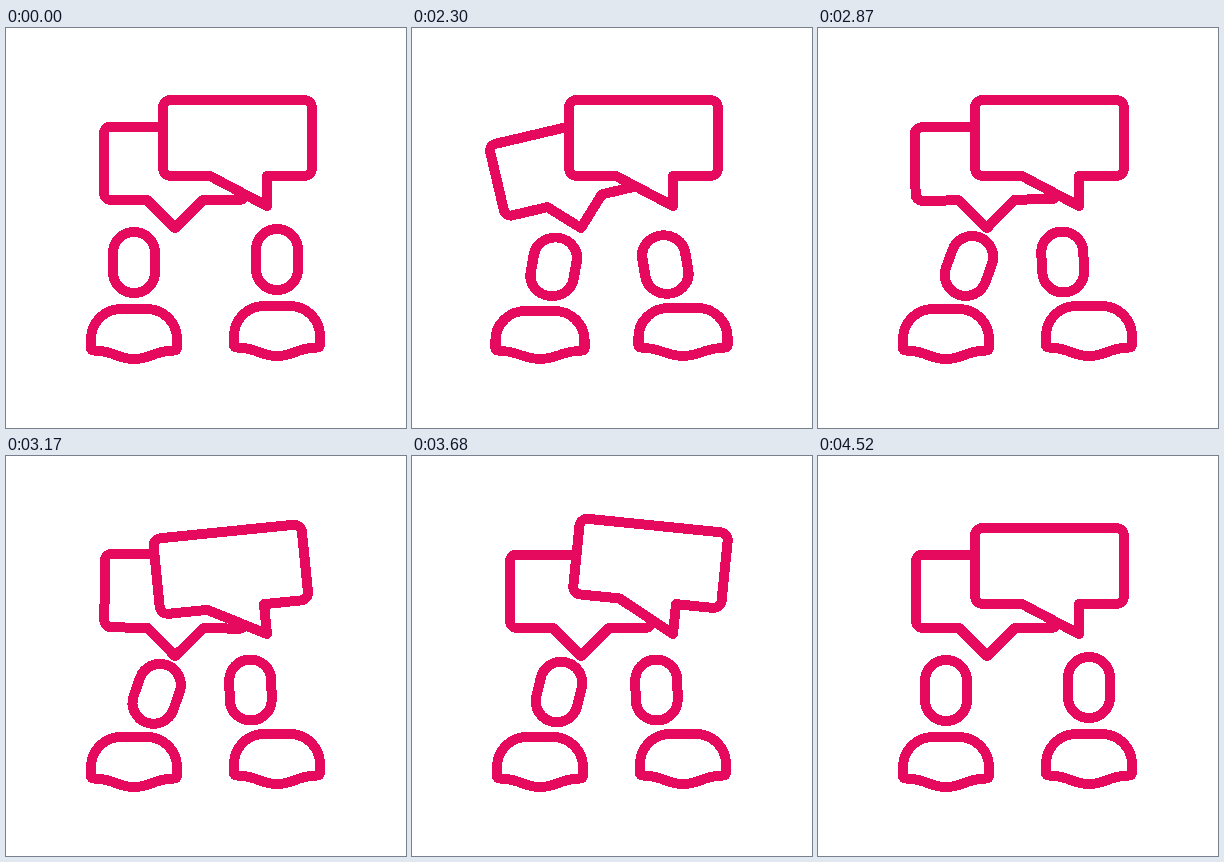
An HTML page for the animation above (4550 ms loop, 400 px wide and 400 px high).

```html
<!DOCTYPE html>
<html>
<head>
<meta charset="utf-8">
<style>
  html, body { margin: 0; width: 100%; height: 100%; overflow: hidden; background: #fff; }
  svg { display: block; width: 100vw; height: 100vh; shape-rendering: crispEdges; }
  path, rect { fill: #fff; stroke: #e60a5e; stroke-width: 10; stroke-linejoin: round; }
</style>
</head>
<body>
<svg viewBox="0 0 400 400">
  <defs>
    <path id="body" d="M-43 -11V-20A30 30 0 0 1 -13 -50H13A30 30 0 0 1 43 -20V-11Q43 -8.500 40 -8.500C18 -8 18 0 0 0S-18 -8 -40 -8.500Q-43 -8.500 -43 -11Z"/>
    <rect id="head" x="-21" y="-127" width="42" height="61" rx="21"/>
  </defs>
  <g id="left"><use href="#body"/><use class="head" href="#head"/></g>
  <g id="right"><use href="#body"/><use class="head" href="#head"/></g>
  <path id="back" d="M105 98.500H233a7 7 0 0 1 7 7V165a7 7 0 0 1 -7 7H197L169 200L141 172H105a7 7 0 0 1 -7 -7V105.500a7 7 0 0 1 7 -7Z"/>
  <path id="front" d="M165 72H298a8 8 0 0 1 8 8V140a8 8 0 0 1 -8 8H261V178L204 148H165a8 8 0 0 1 -8 -8V80a8 8 0 0 1 8 -8Z"/>
</svg>
<script>
const LOOP = 4550, MOVE = 500, BEAT = 248;
const SPEAK = 1983, NOD = 2400, REPLY = 3083, RIGHT_BACK = 3690, LEFT_BACK = 4015;
const $ = selector => document.querySelector(selector);
const progress = (t, start, length = MOVE) => Math.min(1, Math.max(0, (t - start) / length));
const ramp = (...args) => { const p = progress(...args); return p * p * (3 - 2 * p); };
const between = (t, from, to) => ramp(t, from) - ramp(t, to);
const bump = (t, start) => Math.sin(Math.PI * progress(t, start)) ** 2;

// Alternating swing that loses 5 degrees with every beat
function swing(t, start) {
  let angle = 0;
  for (let i = 0; i < 5; i++) {
    const next = (20 - 5 * i) * (i % 2 ? 1 : -1);
    const last = i ? (25 - 5 * i) * (i % 2 ? -1 : 1) : 0;
    angle += (next - last) * ramp(t, start + i * BEAT, BEAT);
  }
  return angle;
}

function person(t, id, x, y, back, { dx, dy, tilt }) {
  const squash = bump(t, SPEAK) + bump(t, back);
  $('#' + id).setAttribute('transform',
    `translate(${x} ${y}) scale(${1 + .04 * squash} ${1 - .042 * squash})`);
  $(`#${id} .head`).setAttribute('transform', `translate(${dx} ${dy}) rotate(${tilt} 0 -96.5)`);
}

function draw(t) {
  $('#back').setAttribute('transform', `rotate(${swing(t, SPEAK)} 169 200)`);
  $('#front').setAttribute('transform', `rotate(${swing(t, REPLY)} 261 178)`);

  const leftLean = between(t, SPEAK, LEFT_BACK), leftNod = between(t, NOD, REPLY);
  person(t, 'left', 128, 331, LEFT_BACK, {
    dx: 19 * leftLean + 4 * leftNod,
    dy: 1.5 * leftLean + 2 * leftNod,
    tilt: 13.5 * leftLean + 6.5 * leftNod
  });

  const rightLean = between(t, SPEAK, RIGHT_BACK), rightNod = between(t, SPEAK, SPEAK + MOVE);
  person(t, 'right', 271, 328, RIGHT_BACK, {
    dx: -26.5 * rightLean + 2 * rightNod,
    dy: 2.5 * rightLean,
    tilt: -1.5 * rightLean - 11.5 * rightNod
  });
}

const begin = performance.now();
function tick() {
  draw((performance.now() - begin) % LOOP);
  requestAnimationFrame(tick);
}
tick();
</script>
</body>
</html>
```
